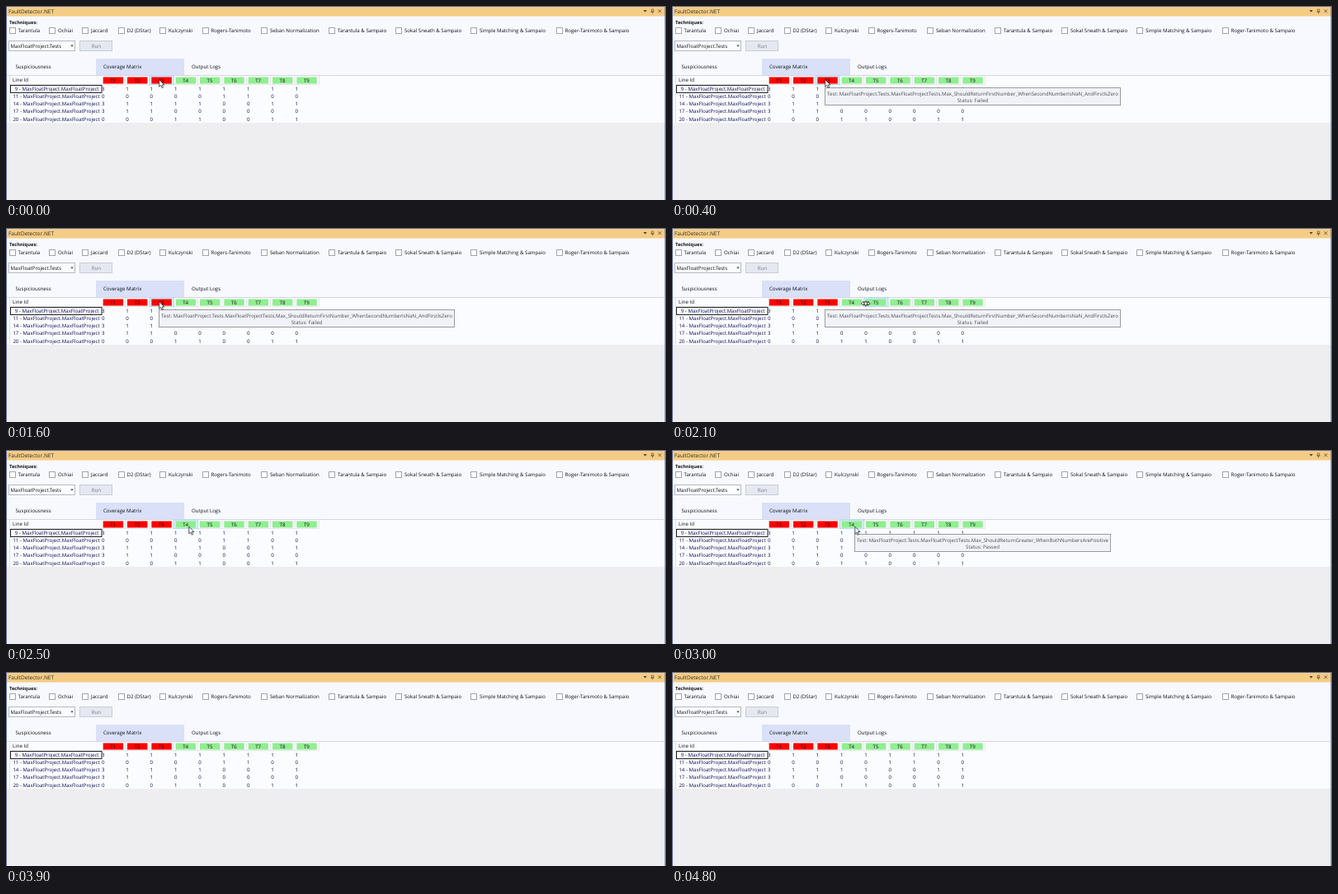
These frames come from a looping animation (800 px wide and 236 px high, 4.9 s). An HTML page:

```html
<!DOCTYPE html>
<html lang="en">
<head>
<meta charset="utf-8">
<title>Coverage matrix</title>
<style>
  html, body { margin: 0; width: 100%; height: 100%; overflow: hidden; background: #eeeef0; }
  svg { display: block; width: 800px; height: 236px; }
  text { font: 6.13px "Open Sans", "Noto Sans", sans-serif; fill: #121216; text-rendering: geometricPrecision; white-space: pre; }
  .bold { font-size: 5.75px; font-weight: 700; }
  .title { font-size: 6.5px; fill: #33301f; }
  .cell { font-size: 6.1px; fill: #0c0c50; }
  .tip text { font-size: 6.08px; fill: #4c4c52; }
  .mid { text-anchor: middle; }
</style>
</head>
<body>
<svg id="stage" viewBox="0 0 800 236"></svg>
<script>
const LOOP = 4900, STEP = 100;
const COL_X = 115.7, COL_W = 29.33;
const HEAD_TOP = 84.5, HEAD_BOTTOM = 96;
const stage = document.getElementById('stage');

function add(tag, attrs, parent = stage) {
  const el = document.createElementNS('http://www.w3.org/2000/svg', tag);
  for (const key in attrs) el.setAttribute(key, attrs[key]);
  return parent.appendChild(el);
}
const rect = (x, y, width, height, fill, stroke = 'none', parent) =>
  add('rect', { x, y, width, height, fill, stroke }, parent);
const path = (d, stroke, fill = 'none', width = 0.8, parent) =>
  add('path', { d, stroke, fill, 'stroke-width': width }, parent);
function text(str, x, y, cls = '', parent) {
  add('text', { x, y, class: cls }, parent).textContent = str;
}

// Window frame and title bar
rect(0, 0, 800, 236, '#eeeef0');
rect(0, 0, 800, 84, '#f7f9fe');
rect(0, 84, 800, 58, '#fbfcff');
rect(0, 1, 800, 11.5, '#f5cc84');
rect(0, 0, 800, 1, '#5d6b99');
rect(0, 0, 1, 236, '#5d6b99');
rect(798.5, 0, 1.5, 236, '#5570b5');
text('FaultDetector.NET', 3, 8.8, 'title');
path('M772.5 5h4.4l-2.2 2.6z', 'none', '#4d4226');
path('M782.4 4h2.4v3h-2.4zM781.4 7h4.4M783.6 7v2.5', '#4d4226', 'none', 0.6);
path('M790.5 4.3l3.8 3.8M794.3 4.3l-3.8 3.8', '#4d4226', 'none', 0.8);

// Technique options
text('Techniques:', 4, 22.3, 'bold');
const techniques = {
  'Tarantula': 4, 'Ochiai': 52.5, 'Jaccard': 92.5, 'D2 (DStar)': 136, 'Kulczynski': 186.5,
  'Rogers-Tanimoto': 238, 'Seban Normalization': 309.5, 'Tarantula & Sampaio': 391.5,
  'Sokal Sneath & Sampaio': 472.5, 'Simple Matching & Sampaio': 563.5, 'Roger-Tanimoto & Sampaio': 667
};
for (const name in techniques) {
  const x = techniques[name];
  rect(Math.floor(x) + 0.5, 26.5, 7, 7, '#fff', '#a3a5ad');
  text(name, x + 10.5, 32.3);
}

// Project picker and button
rect(3.5, 42.5, 80, 12, '#fbfcff', '#b4b8c3');
text('MaxFloatProject.Tests', 5.6, 50.7);
path('M78.3 47.5h3.4l-1.7 2.2z', 'none', '#444');
rect(89.5, 42.5, 39, 12, '#e5e8f1', '#c8ccd8');
const run = add('g', { opacity: 0.5 });
text('Run', 109.3, 50.8, 'mid', run);

// Tabs
rect(109, 64, 107, 20, '#d9e0f8');
text('Suspiciousness', 11.4, 76.2);
text('Coverage Matrix', 118, 76.2);
text('Output Logs', 225, 76.2);
rect(1, 84, 797.5, 1, '#d5d7df');

// Matrix header
rect(4, 84, 1, 58, '#dddfe6');
rect(5, 95, 374, 1, '#e6e8ef');
text('Line Id', 8, 92.3);
const hover = rect(0, HEAD_TOP + 0.5, COL_W, 10.5, '#d3effc', '#b2dcf2');
for (let i = 0; i < 9; i++) {
  const x = COL_X + i * COL_W;
  rect(x + COL_W - 0.6, 85, 0.6, 10.5, '#d5d7df');
  rect(x + 2, 86.5, 24.4, 8, i < 3 ? '#ff0000' : '#90ee90');
  text('T' + (i + 1), x + 14, 92.7, 'mid');
}

// Matrix rows: line number and one digit per test
const rows = [[9, '311111111'], [11, '000001100'], [14, '311110011'], [17, '311000000'], [20, '000110011']];
rows.forEach(([line, hits], r) => {
  const y = 103.3 + r * 9.05;
  text(`${line} - MaxFloatProject.MaxFloatProject`, line < 10 ? 10.8 : 8.4, y, 'cell');
  [...hits].forEach((n, i) => text(n, COL_X + 0.2 + i * COL_W, y, 'cell'));
});
rect(5.5, 96.5, 110.5, 9, 'none', '#222');

// Tooltips
function tooltip(x, y, width, test, status, from, to) {
  const g = add('g', { class: 'tip' });
  rect(x, y, width, 21, '#f1f2f7', '#9a9aa0', g);
  text(`Test: MaxFloatProject.Tests.MaxFloatProjectTests.${test}`, x + width / 2, y + 9.1, 'mid', g);
  text(`Status: ${status}`, x + width / 2, y + 17.2, 'mid', g);
  return { g, from, to };
}
const tips = [
  tooltip(185.5, 99.5, 358, 'Max_ShouldReturnFirstNumber_WhenSecondNumberIsNaN_AndFirstIsZero', 'Failed', 200, 2300),
  tooltip(221.5, 102.5, 310, 'Max_ShouldReturnGreater_WhenBothNumbersArePositive', 'Passed', 2700, 3500)
];

// Pointers, drawn with the hot spot at the origin
const arrow = path('M0 0V8.6L2 6.8L3.4 10L4.9 9.3L3.5 6.3H6.2Z', '#111', '#fff', 0.7);
const sizer = path('M-5.5 0L-2.7-2.4V-.8H-1V-2.6H1V-.8H2.7V-2.4L5.5 0L2.7 2.4V.8H1V2.6H-1V.8H-2.7V2.4Z', '#111', '#fff', 0.8);

// Pointer route: time, x, y
const route = [[0, 185.7, 89.6], [1700, 185.7, 89.6], [2100, 234.8, 91.8], [2300, 234.8, 91.8],
  [2500, 221.8, 93.2], [3400, 221.8, 93.2], [3800, 262, -14], [LOOP, 262, -14]];

function pointerAt(t) {
  const i = route.findIndex(key => key[0] > t);
  const [t0, x0, y0] = route[i - 1], [t1, x1, y1] = route[i];
  const p = (t - t0) / (t1 - t0), e = p * p * (3 - 2 * p);
  return [x0 + (x1 - x0) * e, y0 + (y1 - y0) * e];
}
const show = (el, on) => el.setAttribute('visibility', on ? 'visible' : 'hidden');

function draw(now) {
  const t = Math.floor(now % LOOP / STEP) * STEP;
  const [x, y] = pointerAt(t);
  const inHead = y > HEAD_TOP && y < HEAD_BOTTOM;
  const pos = (x - COL_X) / COL_W;
  const onEdge = inHead && Math.abs(pos - Math.round(pos)) * COL_W < 3;
  show(hover, inHead);
  hover.setAttribute('x', COL_X + Math.floor(pos) * COL_W - 0.4);
  for (const el of [arrow, sizer]) {
    el.setAttribute('transform', `translate(${x} ${y})`);
    show(el, (el === sizer) === onEdge);
  }
  for (const { g, from, to } of tips) show(g, t >= from && t < to);
}

let start;
function tick(now) {
  start ??= now;
  draw(now - start);
  requestAnimationFrame(tick);
}
draw(0);
requestAnimationFrame(tick);
</script>
</body>
</html>
```
